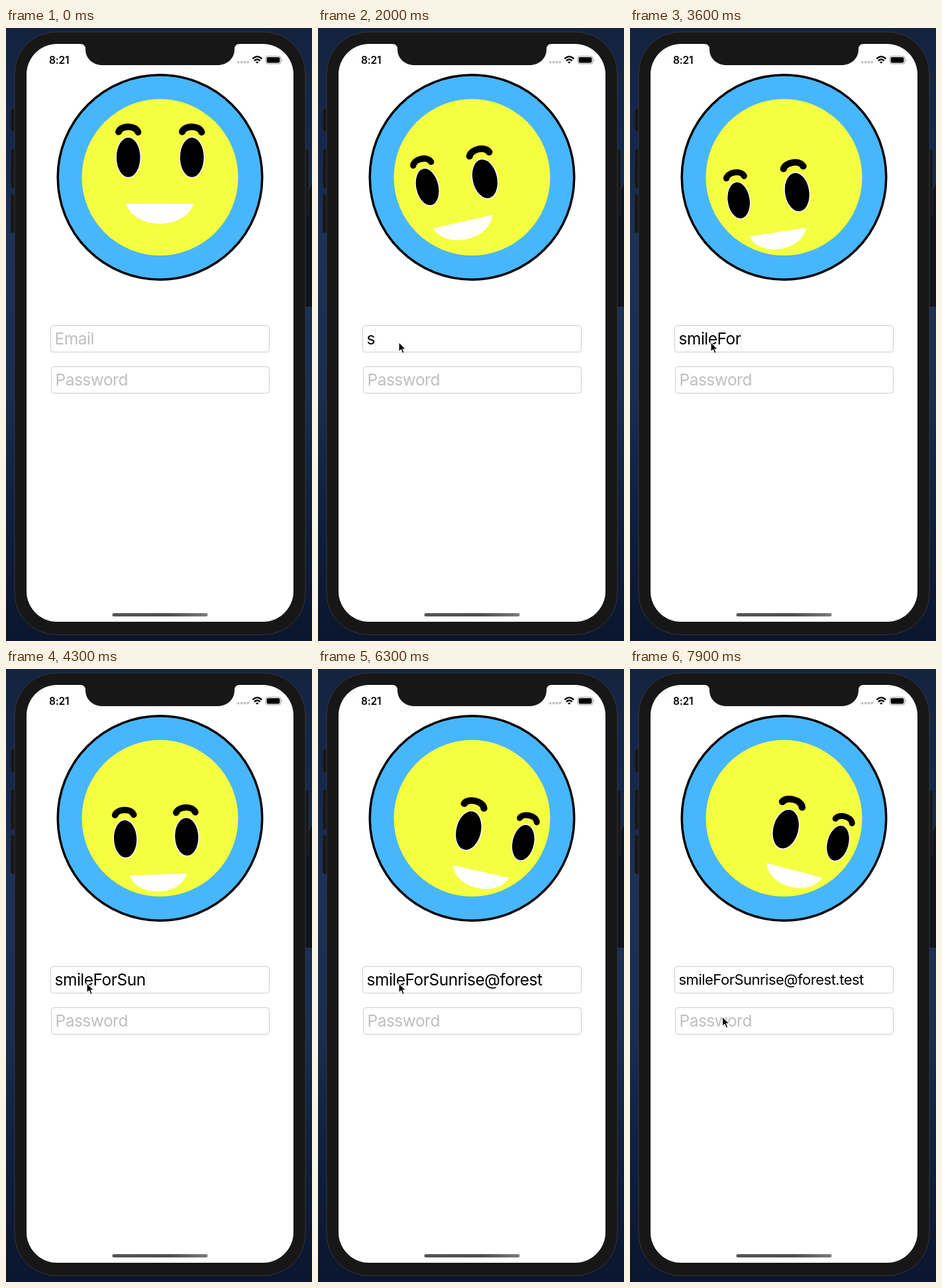
These frames come from a looping animation (462x924 px, 8 s). An HTML page:

```html
<!DOCTYPE html>
<html lang="en">
<head>
<meta charset="utf-8">
<title>Login face</title>
<style>
  html, body { margin: 0; width: 100%; height: 100%; overflow: hidden; background: #0c1830; }
  svg { display: block; width: 100%; height: 100%; }
  text { font-family: Inter, Roboto, sans-serif; white-space: pre; }
  .field { fill: #fff; stroke: #ccc; }
  .entry { font-size: 24.5px; letter-spacing: -.5px; }
  .hint { fill: #bfbfc1; }
  .brow { fill: none; stroke: #000; stroke-width: 10; stroke-linecap: round; }
</style>
</head>
<body>
<svg viewBox="0 0 462 924">
  <defs>
    <linearGradient id="sea" x2="0" y2="1">
      <stop offset="0" stop-color="#14233f"/>
      <stop offset=".2" stop-color="#14284f"/>
      <stop offset=".35" stop-color="#1b3258"/>
      <stop offset=".6" stop-color="#182d50"/>
      <stop offset=".8" stop-color="#0f1f3d"/>
      <stop offset="1" stop-color="#0b162e"/>
    </linearGradient>
    <linearGradient id="bar">
      <stop offset="0" stop-color="#555"/>
      <stop offset=".6" stop-color="#4e4e4e"/>
      <stop offset="1" stop-color="#7c7c7c"/>
    </linearGradient>
    <g id="eye">
      <ellipse rx="18.6" ry="30.5" stroke="#fff" stroke-width="1.5"/>
      <path class="brow" d="M-14.7-38.5C-11-48.5 11-49 14.7-38"/>
    </g>
  </defs>

  <rect width="462" height="924" fill="url(#sea)"/>
  <path d="M462 235L450 262V420H462Z" fill="#10141f"/>

  <g fill="#14171c" stroke="#2a2d33" stroke-width=".8">
    <rect x="7" y="121" width="9" height="35" rx="2"/>
    <rect x="7" y="182" width="9" height="60" rx="2"/>
    <rect x="7" y="250" width="9" height="59" rx="2"/>
    <rect x="448" y="183" width="9" height="97" rx="2"/>
  </g>
  <rect x="13" y="6" width="439" height="908.5" rx="63" fill="#171717" stroke="#34363a"/>
  <rect x="31" y="24" width="403" height="871" rx="46" fill="#fff"/>
  <path d="M112 23V24Q120 24 120 32C120 46 131 56 146 56H319C334 56 345 46 345 32Q345 24 353 24V23Z" fill="#171717"/>

  <text x="65" y="53.5" font-size="15.5" font-weight="600" letter-spacing="-.2">8:21</text>
  <g fill="#c3c3c3">
    <circle cx="350.7" cy="51.5" r="2"/><circle cx="355.6" cy="51.5" r="2"/>
    <circle cx="360.4" cy="51.5" r="2"/><circle cx="365.2" cy="51.5" r="2"/>
  </g>
  <g fill="none" stroke="#000" stroke-width="2.4">
    <path d="M372.3 46.3Q379.3 39.7 386.3 46.3M374.9 49.4Q379.3 45.3 383.7 49.4"/>
    <path d="M377 51.3Q379.3 49.6 381.6 51.3L379.3 53.7Z" fill="#000" stroke="none"/>
  </g>
  <rect x="392" y="42.5" width="23" height="11.5" rx="3.2" fill="#fff" stroke="#999"/>
  <rect x="393.6" y="44" width="19.8" height="8.4" rx="1.8"/>
  <path d="M416.4 46.3Q418 48.2 416.4 50.2Z" fill="#888"/>

  <circle cx="232.5" cy="225" r="154.3" fill="#48b6fb" stroke="#000" stroke-width="3.5"/>
  <circle cx="232.5" cy="225" r="118" fill="#f5ff41"/>
  <path id="mouth" d="M-51 0C-38 40 38 40 51 0Z" fill="#fff"/>
  <use id="leftEye" href="#eye"/>
  <use id="rightEye" href="#eye"/>

  <rect class="field" x="67.5" y="448.5" width="330" height="40" rx="4"/>
  <rect class="field" x="68.5" y="510.5" width="329" height="40" rx="4"/>
  <text id="email" class="entry" x="73.5" y="477"></text>
  <rect id="caret" y="453" width="1.5" height="31" fill="#eceef5"/>
  <text class="entry hint" x="74.5" y="539">Password</text>

  <rect x="160.5" y="882" width="144" height="5" rx="2.5" fill="url(#bar)"/>
  <path id="pointer" d="M0 0V14.5L3.4 11.5L5.8 17L8.3 16L6 10.6H10.6Z" stroke="#fff" stroke-width="1.1"/>
</svg>
<script>
const LOOP = 8000;
const ADDRESS = 'smileForSunrise@forest.test';

// Tracks are lists of [time, value].
const TYPED = [[1499, 0], [1500, 1], [2350, 1], [2700, 4], [3600, 8], [5200, 17], [6300, 22], [7200, 27]];
const TILT = [[1600, 0], [2200, -19], [2400, -19], [2700, -16], [3600, -8.6], [5200, 6], [6300, 12.6], [6900, 14.7]];
const LOOK_DOWN = [[1600, 0], [2200, 1]];
const POINTER_X = [[300, 470], [900, 122], [7750, 122], [7900, 139.5]];
const POINTER_Y = [[300, 560], [900, 473.5], [7750, 473.5], [7900, 524]];

const [mouth, leftEye, rightEye, email, caret, pointer] =
  ['mouth', 'leftEye', 'rightEye', 'email', 'caret', 'pointer'].map(id => document.getElementById(id));

const mix = (a, b, k) => a + (b - a) * k;

function at(track, t) {
  const next = track.findIndex(([time]) => time > t);
  if (next < 0) return track[track.length - 1][1];
  if (next === 0) return track[0][1];
  const [t0, v0] = track[next - 1], [t1, v1] = track[next];
  return mix(v0, v1, (t - t0) / (t1 - t0));
}

const place = (node, x, y, angle = 0, sx = 1, sy = sx) =>
  node.setAttribute('transform', `translate(${x} ${y}) rotate(${angle}) scale(${sx} ${sy})`);

// The left eye mirrors the right one at the opposite tilt.
function placeEye(node, side, tilt, down) {
  const a = tilt * side;
  const dx = mix(48, 46.5 + 2.85 * a - .033 * a * a, down);
  const y = mix(195, 254.5 + .72 * a - .012 * a * a, down);
  place(node, 232.7 + side * dx, y, tilt,
    mix(1, .97 - .0055 * a, down), mix(1, .95 - .0033 * a, down));
}

function draw(t) {
  const tilt = at(TILT, t), down = at(LOOK_DOWN, t);
  placeEye(leftEye, -1, tilt, down);
  placeEye(rightEye, 1, tilt, down);
  place(mouth, 232.3 + 1.08 * tilt, mix(265, 310 - .03 * tilt * tilt, down), tilt, mix(1, .85, down));

  const count = Math.floor(at(TYPED, t) + .01);
  const full = count === ADDRESS.length;
  email.textContent = count ? ADDRESS.slice(0, count) : 'Email';
  email.classList.toggle('hint', !count);
  email.style.fontSize = full ? '22px' : '';
  email.setAttribute('y', full ? 476 : 477);
  caret.setAttribute('x', 73.5 + email.getComputedTextLength());
  caret.style.display = count && !full ? '' : 'none';

  place(pointer, at(POINTER_X, t), at(POINTER_Y, t));
}

function tick() {
  draw(performance.now() % LOOP);
  requestAnimationFrame(tick);
}
tick();
</script>
</body>
</html>
```
